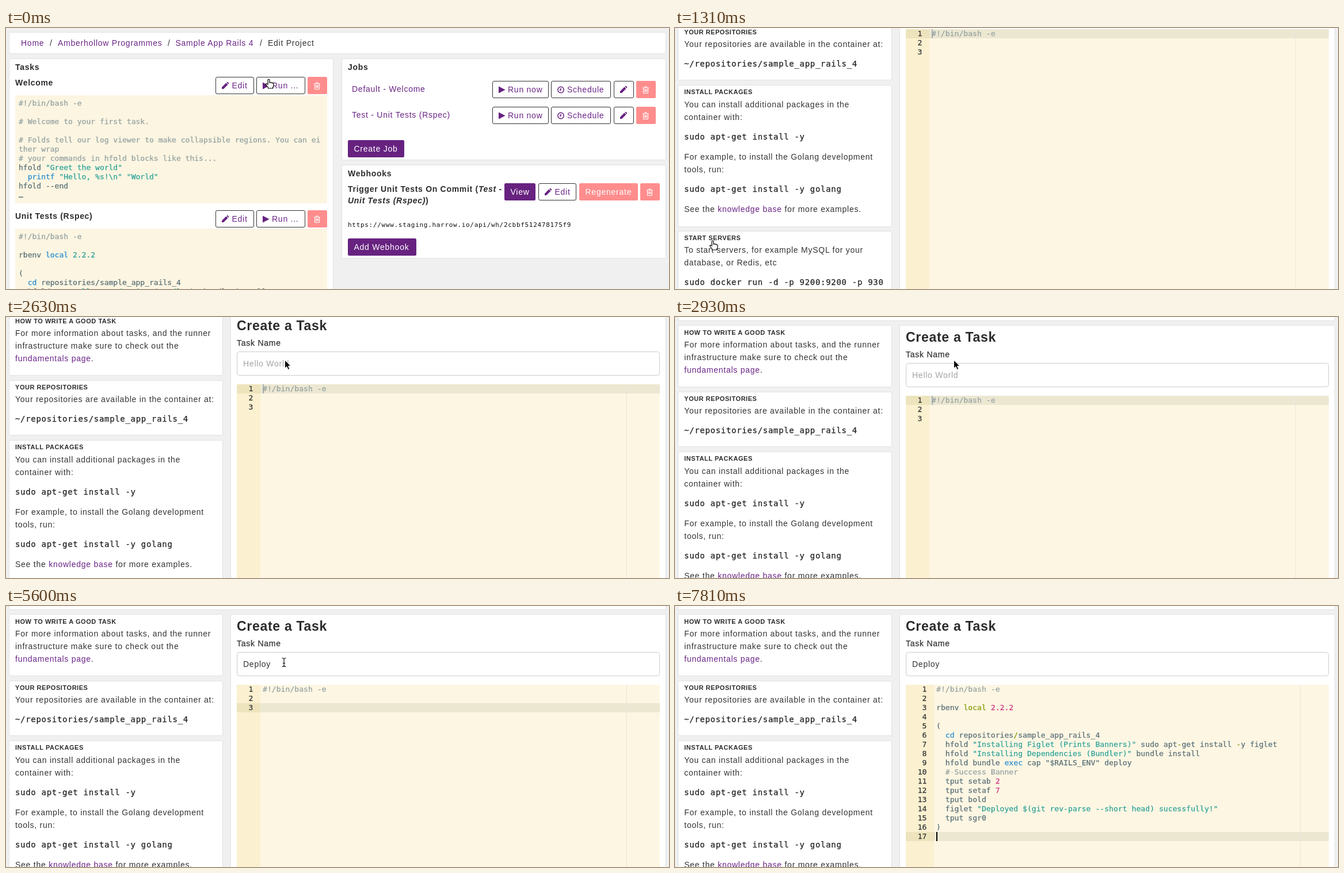
An HTML page that plays this animation: 1152x454 px, repeating every 8000 ms.

```html
<!DOCTYPE html>
<html lang="en">
<head>
<meta charset="utf-8">
<title>Create a task</title>
<style>
html, body { margin: 0; width: 100%; height: 100%; overflow: hidden; background: #f0f0f0; }
svg { display: block; width: 100%; height: 100%; }
text { font: 14px "Liberation Sans", Arial, sans-serif; letter-spacing: .75px; color: #333; white-space: pre; }
text, tspan { fill: currentColor; }
.bold { font-weight: 700; letter-spacing: .7px; color: #2b2b2b; }
.title { font-size: 23px; }
.cap { font-size: 11px; letter-spacing: .55px; }
.it { font-style: italic; }
.link { color: #6b2586; }
.white { color: #fff; }
.hint { color: #a3a3a3; }
.code, .edit, .shell, .url { font-family: "DejaVu Sans Mono", "Liberation Mono", monospace; }
.code, .edit, .shell, .code tspan, .edit tspan { stroke: currentColor; stroke-width: .25px; }
.code { font-size: 13px; letter-spacing: 0; color: #586e75; }
.edit { font-size: 13px; letter-spacing: .07px; color: #586e75; }
.shell { letter-spacing: .69px; color: #222; }
.url { font-size: 11px; letter-spacing: .7px; color: #111; }
.num { color: #333; text-anchor: end; }
.com { color: #93a1a1; }
.str { color: #2aa198; }
.fn { color: #268bd2; }
.kw { color: #859900; }
.lit { color: #d33682; }
.faint { color: #cfcfc4; }
.card { fill: #fff; stroke: #e2e2e2; }
.solid { fill: #672280; }
.warn { fill: #ff8d8d; }
.line { fill: #fff; stroke: #333; }
</style>
</head>
<body>
<svg id="stage" viewBox="0 0 1152 454"></svg>
<script>
const LOOP = 8000;

const text = (x, y, s, cls = '') => `<text x="${x}" y="${y}" class="${cls}">${s}</text>`;
const span = (cls, s) => `<tspan class="${cls}">${s}</tspan>`;
const rect = (x, y, w, h, fill, extra = '') =>
  `<rect x="${x}" y="${y}" width="${w}" height="${h}" fill="${fill}" ${extra}/>`;
const card = (x, y, right, bottom) =>
  `<rect class="card" x="${x - .5}" y="${y - .5}" width="${right - x + 1}" height="${bottom - y + 1}" rx="1.5"/>`;
const lines = (x, y, cls, rows, step = 16) =>
  rows.map((s, i) => s && text(x, y + i * step, s, cls)).join('');

// Each icon: path, label offset inside a button, stroke width (0 = filled)
const ICONS = {
  pen: ['M0 12V9L7.5 1.5l3 3L3 12ZM8.3 .8l1-.8q.5-.3 1 0l1.8 1.8q.4.5 0 1l-.9.9Z', 28.5, 0],
  play: ['M0 .5V12.5L11.5 6.5Z', 27, 0],
  clock: ['M11.2 6.5a5.2 5.2 0 1 1-10.4 0 5.2 5.2 0 1 1 10.4 0M6 3.5V7H3.8', 28, 1.5],
  bin: ['M0 3H11M3.7 3L4.3 1h2.4L7.3 3M1.5 3V11.5q0 1 1 1h6q1 0 1-1V3M3.7 5.2V10.3M5.5 5.2V10.3M7.3 5.2V10.3', 0, 1.1]
};

function button(x, y, w, kind, label, icon) {
  const outlined = kind === 'line', inset = outlined ? .5 : 0;
  let out = `<rect class="${kind}" x="${x + inset}" y="${y + inset}" width="${w - 2 * inset}" height="${30 - 2 * inset}" rx="2.5"/>`;
  let dx = 10.5;
  if (icon) {
    const [d, offset, stroke] = ICONS[icon];
    const color = outlined ? '#672280' : '#fff';
    const paint = stroke ? `fill="none" stroke="${color}" stroke-width="${stroke}"` : `fill="${color}"`;
    out += `<path d="${d}" ${paint} transform="translate(${x + 11} ${y + 9})"/>`;
    dx = offset;
  }
  return out + (label ? text(x + dx, y + 20, label, outlined ? 'link' : 'white') : '');
}

const bin = (x, y) => button(x, y, 34, 'warn', '', 'bin');
const taskHead = (y, name) => text(16, y + 15, name, 'bold') +
  button(364, y, 67, 'line', 'Edit', 'pen') + button(435, y, 85, 'line', 'Run ...', 'play') + bin(524, y);
const jobRow = (y, name) => text(601, y + 19, name, 'link') +
  button(845, y, 98, 'line', 'Run now', 'play') + button(947, y, 104, 'line', 'Schedule', 'clock') +
  button(1056, y, 35, 'line', '', 'pen') + bin(1095, y);

const projectPage = () => [
  card(6, 8, 1146, 44),
  text(26, 31, 'Home', 'link'), text(76, 31, '/'),
  text(90, 31, 'Amberhollow Programmes', 'link'), text(281, 31, '/'),
  text(294.5, 31, 'Sample App Rails 4', 'link'), text(441, 31, '/'), text(455, 31, 'Edit Project'),

  card(6, 54, 568, 567), text(16, 73, 'Tasks', 'bold'),
  taskHead(85, 'Welcome'), rect(16, 117, 542, 188, '#fcf5e1'),
  lines(22, 135, 'code', [
    span('com', '#!/bin/bash -e'), '',
    span('com', '# Welcome to your first task.'), '',
    span('com', '# Folds tell our log viewer to make collapsible regions. You can ei'),
    span('com', 'ther wrap'),
    span('com', '# your commands in hfold blocks like this...'),
    'hfold ' + span('str', '"Greet the world"'),
    '  ' + span('fn', 'printf') + ' ' + span('str', '"Hello, %s!\\n" "World"'),
    'hfold --end', '…'
  ]),
  taskHead(317, 'Unit Tests (Rspec)'), rect(16, 349, 542, 172, '#fcf5e1'),
  lines(22, 367, 'code', [
    span('com', '#!/bin/bash -e'), '',
    `rbenv ${span('fn', 'local')} ${span('str', '2.2.2')}`, '', '(',
    `  ${span('fn', 'cd')} repositories/sample_app_rails_4`,
    `  hfold ${span('str', '"Install Dependencies (Bundler)"')} bundle install`,
    '  cp config/database.yml{.example,}',
    `  bundle ${span('fn', 'exec')} rake spec`, '…'
  ]),
  button(16, 533, 88, 'solid', 'Add Task'),
  card(6, 577, 568, 760), text(16, 596, 'Environments', 'bold'),

  card(584, 54, 1146, 229), text(594, 73, 'Jobs', 'bold'),
  jobRow(92, 'Default - Welcome'), jobRow(137, 'Test - Unit Tests (Rspec)'),
  button(594, 195, 98, 'solid', 'Create Job'),

  card(584, 239, 1146, 400), text(594, 258, 'Webhooks', 'bold'),
  text(594, 285, 'Trigger Unit Tests On Commit (' + span('it', 'Test -'), 'bold'),
  text(594, 305, span('it', 'Unit Tests (Rspec)') + ')', 'bold'),
  button(866, 270, 54, 'solid', 'View'), button(925, 270, 66, 'line', 'Edit', 'pen'),
  button(996, 270, 102, 'warn', 'Regenerate'), bin(1102, 270),
  text(594, 346, 'https://www.staging.harrow.io/api/wh/2cbbf512478175f9', 'url'),
  button(594, 366, 119, 'solid', 'Add Webhook')
].join('');

const dash = span('kw', '-');
const STARTER = [span('com', '#!/bin/bash -e'), '', ''];
const SCRIPT = [
  span('com', '#!/bin/bash -e'), '',
  `rbenv ${span('kw', 'local')} ${span('lit', '2.2.2')}`, '', '(',
  `  ${span('fn', 'cd')} repositories${span('kw', '/')}sample_app_rails_4`,
  `  hfold ${span('str', '"Installing Figlet (Prints Banners)"')} sudo apt${dash}get install ${dash}y figlet`,
  `  hfold ${span('str', '"Installing Dependencies (Bundler)"')} bundle install`,
  `  hfold bundle ${span('fn', 'exec')} cap "$RAILS_ENV" deploy`,
  '  ' + span('com', '#') + span('faint', '·') + span('com', 'Success Banner'),
  `  tput setab ${span('lit', '2')}`,
  `  tput setaf ${span('lit', '7')}`,
  '  tput bold',
  `  figlet ${span('str', '"Deployed $(git rev-parse --short head) sucessfully!"')}`,
  '  tput sgr0', ')', ''
];

// Gutter ends at x = left; the code starts 4 px after it
const editorBack = left => rect(401, 137, 735, 520, '#fdf6e3') + rect(401, 137, left - 401, 520, '#fbf0d0');
const editorText = (left, rows) => rect(left + 636, 137, 1, 520, '#e8e5dc') +
  lines(left - 12.5, 149, 'edit num', rows.map((_, i) => i + 1)) + lines(left + 4, 149, 'edit', rows);

const taskPage = () => [
  card(6, -31, 1146, 6),
  card(6, 15, 376, 121), text(16, 31, 'HOW TO WRITE A GOOD TASK', 'bold cap'),
  lines(16, 53, '', ['For more information about tasks, and the runner',
    'infrastructure make sure to check out the', span('link', 'fundamentals page') + '.'], 22),
  card(6, 131, 376, 225), text(16, 146, 'YOUR REPOSITORIES', 'bold cap'),
  text(16, 168, 'Your repositories are available in the container at:'),
  text(16, 202, '~/repositories/sample_app_rails_4', 'shell'),
  card(6, 235, 376, 480), text(16, 250, 'INSTALL PACKAGES', 'bold cap'),
  lines(16, 273, '', ['You can install additional packages in the', 'container with:'], 22),
  text(16, 329, 'sudo apt-get install -y', 'shell'),
  lines(16, 364, '', ['For example, to install the Golang development', 'tools, run:'], 22),
  text(16, 420, 'sudo apt-get install -y golang', 'shell'),
  text(16, 455, `See the ${span('link', 'knowledge base')} for more examples.`),
  card(6, 489, 376, 720), text(16, 504, 'START SERVERS', 'bold cap'),
  lines(16, 526, '', ['To start servers, for example MySQL for your', 'database, or Redis, etc'], 22),
  text(16, 582, 'sudo docker run -d -p 9200:9200 -p 930', 'shell'),

  card(391, 15, 1146, 720),
  text(401, 43, 'Create a Task', 'bold title'),
  `<text x="401" y="70" stroke="#333" stroke-width=".25">Task Name</text>`,
  rect(401.5, 80.5, 734, 41, '#fff', 'id="field" rx="4"'),
  '<text id="name" x="412" y="106"></text>', rect(423, 93, 1, 16, '#111', 'id="nameCaret"'),
  `<g id="backA">${editorBack(442)}</g><g id="backB">${editorBack(450)}</g>`,
  `<g id="active">${rect(401, 137, 735, 16, '#ece7d1')}${rect(401, 137, 1, 16, '#ede4bd', 'id="activeNum"')}</g>`,
  rect(446, 137, 2, 16, '#000', 'id="caret"'),
  `<g id="textA">${editorText(442, STARTER)}</g><g id="textB">${editorText(450, SCRIPT)}</g>`
].join('');

const POINTERS = {
  arrow: '<path d="M0 0V14.2L3.3 11.2L5.6 16.6L8.2 15.5L5.9 10.3H10.3Z" fill="#000" stroke="#fff"/>',
  hand: '<path d="M-2 9V1.5a1.5 1.5 0 0 1 3 0V6q1.5-1 2.5.3 1.5-1 2.5.5 1.8-.5 2 1.5V11q0 2-1.5 3.5V16H-1.5V14.5L-5 10q-1-2 .5-2.2Q-3.5 8-2 9Z" fill="#fff" stroke="#000" stroke-width="1.2"/>',
  beam: '<path d="M-3.5-7.5Q0-7.5 0-5.5Q0-7.5 3.5-7.5M0-6V6M-3.5 7.5Q0 7.5 0 5.5Q0 7.5 3.5 7.5M-2 1.5H2" fill="none" stroke="#111" stroke-width="1.2"/>'
};

const stage = document.getElementById('stage');
stage.innerHTML = rect(0, 0, 1152, 454, '#f0f0f0') +
  `<g id="project">${projectPage()}</g><g id="task">${taskPage()}</g><g id="pointer">` +
  Object.entries(POINTERS).map(([k, s]) => `<g id="${k}">${s}</g>`).join('') + '</g>';

const el = {};
stage.querySelectorAll('[id]').forEach(n => el[n.id] = n);

// Stepped tracks: [time, value...]
const POINTER = [
  [0, 'hand', 457, 89], [150, 'arrow', 494, 150], [300, 'arrow', 270, 330], [440, 'arrow', 169.5, 380],
  [1020, 'arrow', 112, 376], [1170, 'hand', 66, 370], [1750, 'arrow', 170, 270], [1900, 'arrow', 262.5, 185],
  [2050, 'arrow', 380, 110], [2190, 'arrow', 460, 80], [2340, 'arrow', 484.5, 75],
  [3080, 'beam', 483, 98], [5900, ''], [6480, 'beam', 620, 178], [6630, 'beam', 627.5, 315],
  [6780, 'beam', 628, 338], [7220, 'beam', 710, 362], [7370, 'beam', 860, 400],
  [7520, 'beam', 965, 425], [7660, 'beam', 1013, 434], [7810, '']
];
const SCROLL = [[0, 0], [730, 142], [880, 173], [2340, 150], [2490, 95], [2630, 58], [2780, 41], [2930, 38]];
const NAME = [[0, ''], [3520, 'D'], [3820, 'Depl'], [3970, 'Deploy']];
const ROW = [[0, 0], [5010, 2], [5900, 16]];
const CARET = [[0, '#aab2ae'], [4260, '#000'], [4710, ''], [5010, '#000'], [5600, ''],
  [5900, '#000'], [6480, ''], [6930, '#000'], [7370, ''], [7810, '#000']];

const at = (track, t) => track.filter(k => k[0] <= t).pop().slice(1);
const show = (node, on) => node.setAttribute('display', on ? 'inline' : 'none');
const shift = (node, x, y) => node.setAttribute('transform', `translate(${x} ${y})`);

function draw(t) {
  const onTask = t >= 1310, pasted = t >= 5900;
  const [scroll] = at(SCROLL, t);
  show(el.project, !onTask);
  show(el.task, onTask);
  shift(el.project, 0, -scroll);
  shift(el.task, 0, 38 - scroll);

  const [name] = at(NAME, t);
  const focused = t >= 3230 && t < 4260;
  el.name.textContent = name || 'Hello World';
  el.name.setAttribute('class', name ? '' : 'hint');
  el.field.setAttribute('stroke', focused ? '#999' : '#ccc');
  show(el.nameCaret, focused);
  el.nameCaret.setAttribute('x', name && onTask ? Math.round(412 + el.name.getComputedTextLength()) : 412);

  for (const part of ['back', 'text']) {
    show(el[part + 'A'], !pasted);
    show(el[part + 'B'], pasted);
  }
  const [row] = at(ROW, t), [ink] = at(CARET, t);
  shift(el.active, 0, row * 16);
  el.activeNum.setAttribute('width', pasted ? 49 : 41);
  show(el.caret, ink);
  el.caret.setAttribute('fill', ink || 'none');
  shift(el.caret, pasted ? 8 : 0, row * 16);

  const [kind, x, y] = at(POINTER, t);
  for (const k in POINTERS) show(el[k], k === kind);
  if (kind) shift(el.pointer, x, y);
}

const start = performance.now();
function tick() {
  draw((performance.now() - start) % LOOP);
  requestAnimationFrame(tick);
}
tick();
</script>
</body>
</html>
```
